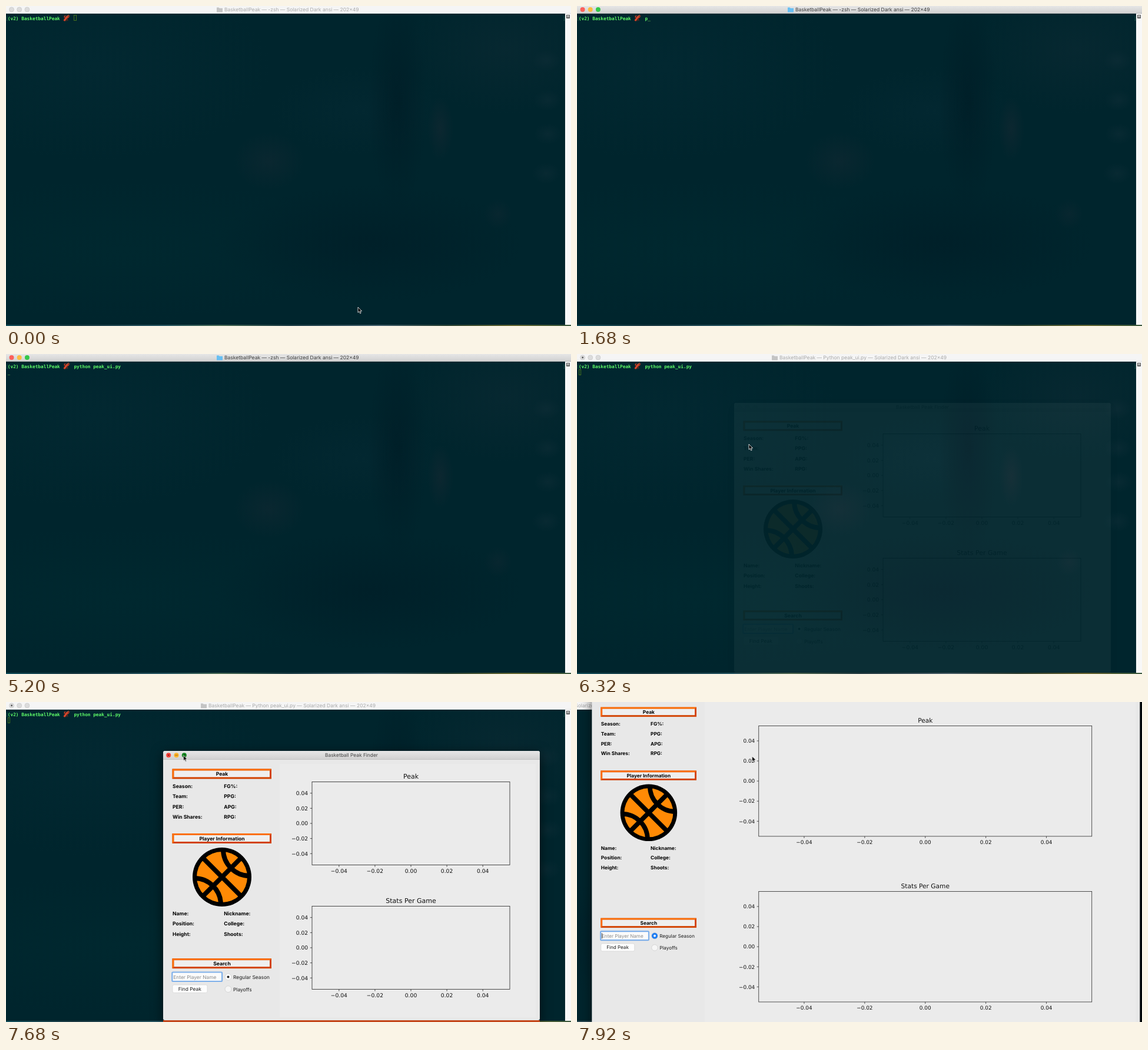
These frames come from a looping animation (960 by 543 pixels, 8000 ms). An HTML page:

```html
<!DOCTYPE html>
<html lang="en">
<head>
<meta charset="utf-8">
<title>Basketball Peak Finder</title>
<style>
html, body { margin: 0; width: 100%; height: 100%; overflow: hidden; background: #000; }
* { text-rendering: geometricPrecision; }
#stage { position: relative; width: 960px; height: 543px; overflow: hidden; background: #00080b; }
#stage svg { position: absolute; left: 0; top: 0; overflow: visible; }
#stage, #stage text { font-family: Inter, "Open Sans", sans-serif; }

/* every animation shares one 8 s clock: 1% = 80 ms */
.a { animation: 8s step-end infinite; }

#term { position: absolute; inset: 0; animation-name: slide; }
#screen {
  position: absolute; left: 0; top: 13px; width: 950px; height: 528px;
  background:
    radial-gradient(24px 18px at 918px 80px, #14303a66, transparent),
    radial-gradient(24px 18px at 920px 147px, #14303a66, transparent),
    radial-gradient(24px 18px at 921px 204px, #14303a66, transparent),
    radial-gradient(24px 18px at 918px 271px, #14303a66, transparent),
    radial-gradient(24px 26px at 836px 340px, #14293366, transparent),
    radial-gradient(60px 50px at 447px 250px, #14293380, transparent),
    radial-gradient(22px 55px at 738px 195px, #18293380, transparent),
    radial-gradient(50px 190px at 665px 150px, #001f28, transparent),
    radial-gradient(150px 75px at 600px 165px, #04293399, transparent),
    radial-gradient(170px 110px at 850px 60px, #0b2a3399, transparent),
    radial-gradient(260px 100px at 620px 390px, #002029, transparent),
    radial-gradient(420px 120px at 200px 400px, #00282f, transparent),
    radial-gradient(300px 160px at 150px 90px, #022831, transparent),
    #00252d;
}
#gutter { position: absolute; left: 950px; top: 13px; width: 10px; height: 528px; background: #f8f8f8; }
#gutter i {
  position: absolute; left: 2px; top: 2px; width: 4px; height: 4px; border: 1px solid #555;
  background: linear-gradient(#fff 25%, #555 25% 50%, #fff 50% 75%, #555 75%);
}
#desk {
  position: absolute; left: 0; top: 541px; width: 960px; height: 2px;
  background: linear-gradient(90deg, #14505c, #203c44 12%, #2c5a66 28%, #52705a 38%, #24424a 50%, #4c6672 66%, #33483a 78%, #6a6a34 90%, #3c5a40);
}
.mono {
  position: absolute; height: 11px; display: flex; white-space: pre;
  font: bold 7.79px/11px "DejaVu Sans Mono", monospace; color: #5ffa68;
}
.dim { color: #27604f; font-weight: normal; }
#typed { width: 0; overflow: hidden; animation-name: type; }
.cur { width: 4.7px; height: 10px; box-sizing: border-box; }
.line { border-bottom: 1px solid #35703f; }
.box { border: 1px solid #44701e; }
#c1 { position: absolute; left: 115px; top: 15px; animation-name: before-focus; }
#c2 { animation-name: row1; }
#c3 { position: absolute; left: 2.8px; top: 26px; animation-name: row2; }
#c4 { position: absolute; left: 2.8px; top: 26px; animation-name: after-blur; }

#b1 { animation-name: before-focus; }
#b2 { animation-name: zsh; }
#b3 { animation-name: python; }
#b4 { animation-name: after-blur; }

#small, #full { transform-origin: 0 0; filter: drop-shadow(0 5px 10px #0009); }
#small { animation-name: open; }
#full { animation-name: zoom; }
#lights { animation-name: hover; }
#ptr { animation: move 8s linear infinite; }
#ptr path { animation-name: shown; }
.b { font-weight: 700; }
#stage text.mpl { font-family: "DejaVu Sans", sans-serif; }

@keyframes type {
  0% { width: 0; } 21% { width: 4.69px; } 23% { width: 9.38px; } 25% { width: 14.07px; }
  28% { width: 23.45px; } 30% { width: 28.14px; } 31% { width: 32.83px; } 32% { width: 37.52px; }
  34% { width: 42.21px; } 36% { width: 46.9px; } 40% { width: 51.59px; } 44% { width: 56.28px; }
  48% { width: 60.97px; } 49% { width: 65.66px; } 51% { width: 70.35px; } 58% { width: 75.04px; }
  61%, 100% { width: 79.8px; }
}
@keyframes before-focus { 0% { opacity: 1; } 11%, 100% { opacity: 0; } }
@keyframes after-blur { 0% { opacity: 0; } 70%, 100% { opacity: 1; } }
@keyframes zsh { 0% { opacity: 0; } 11% { opacity: 1; } 66%, 100% { opacity: 0; } }
@keyframes python { 0% { opacity: 0; } 66% { opacity: 1; } 70%, 100% { opacity: 0; } }
@keyframes row1 { 0% { opacity: 0; } 11% { opacity: 1; } 63%, 100% { opacity: 0; } }
@keyframes row2 { 0% { opacity: 0; } 63% { opacity: 1; } 70%, 100% { opacity: 0; } }
@keyframes hover { 0% { opacity: 0; } 92%, 100% { opacity: 1; } }
@keyframes shown { 0% { opacity: 1; } 21% { opacity: 0; } 70%, 100% { opacity: 1; } }
@keyframes slide {
  0% { transform: none; } 97% { transform: translateX(-70px); }
  98% { transform: translateX(-270px); } 99%, 100% { transform: translateX(-509px); }
}
@keyframes open {
  0% { opacity: 0; transform: translate(267px, 83px); }
  79% { opacity: .05; transform: translate(267px, 83px); }
  80% { opacity: .45; transform: translate(267px, 83px); }
  81% { opacity: .85; transform: translate(267px, 83px); }
  82% { opacity: 1; transform: translate(267px, 83px); }
  97% { opacity: 1; transform: translate(218.6px, 62.3px) scale(1.091, 1.057); }
  98% { opacity: 1; transform: translate(121.8px, 20.8px) scale(1.273, 1.171); }
  99%, 100% { opacity: 0; transform: translate(25px, -20.7px); }
}
@keyframes zoom {
  0% { opacity: 0; transform: translate(267px, 83px) scale(.664, .752); }
  97% { opacity: .3; transform: translate(218.6px, 62.3px) scale(.724, .794); }
  98% { opacity: .8; transform: translate(121.8px, 20.8px) scale(.845, .88); }
  99%, 100% { opacity: 1; transform: translate(25.3px, -20.7px) scale(.9655); }
}
@keyframes move {
  0%, 70% { transform: translate(598px, 511px); animation-timing-function: ease-in-out; }
  79% { transform: translate(292px, 153px); animation-timing-function: ease-in-out; }
  94%, 96% { transform: translate(301.5px, 90.5px); }
  99%, 100% { transform: translate(297.5px, 92px); }
}
</style>
</head>
<body>
<div id="stage">
  <div id="term" class="a">
    <div id="screen"></div>
    <div id="gutter"><i></i></div>
    <div id="desk"></div>
    <svg id="bars" width="960" height="13"></svg>
    <div class="mono dim" style="left:-.8px;top:15.5px">[</div>
    <div class="mono dim" style="left:946px;top:15.5px">]</div>
    <div class="mono" style="left:2.8px;top:15.5px">(v2) BasketballPeak</div>
    <svg width="960" height="40" fill="none" stroke-linecap="round">
      <path d="M98 24.5L101 21M99.500 25.500L102 23M102 25.500L104 23M105 24.500L104 21" stroke="#8f2a16" stroke-width=".9"/>
      <path d="M99.500 24L104 18" stroke="#d8452a" stroke-width="3.200"/>
      <path d="M101 20L99 18.500L100.500 16.500M105 20L107 18L106.500 15.500" stroke="#c43a22" stroke-width="1.500"/>
      <path d="M104 17L105.500 15.500" stroke="#e9643c" stroke-width="1"/>
    </svg>
    <div class="mono" style="left:115.4px;top:15.500px">
      <span id="typed" class="a">python peak_ui.py</span><span id="c2" class="a cur line"></span>
    </div>
    <div id="c1" class="a cur box"></div>
    <div id="c3" class="a cur line"></div>
    <div id="c4" class="a cur box"></div>
  </div>
  <svg id="app" width="960" height="543"></svg>
</div>
<script>
const $ = id => document.getElementById(id);
const rect = (x, y, w, h, fill, more = '') =>
  `<rect x="${x}" y="${y}" width="${w}" height="${h}" fill="${fill}" ${more}/>`;
const dot = (x, y, r, fill, more = '') => `<circle cx="${x}" cy="${y}" r="${r}" fill="${fill}" ${more}/>`;
const path = (d, color, w) => `<path d="${d}" fill="none" stroke="${color}" stroke-width="${w}"/>`;

// text centred vertically on y
const text = (x, y, s, { size = 8.4, anchor = 'start', cls = '', fill = '#1c1c1c' } = {}) =>
  `<text x="${x}" y="${y + size * .364}" font-size="${size}" text-anchor="${anchor}" class="${cls}" fill="${fill}">${s}</text>`;
const bold = (x, y, s, anchor) => text(x, y, s, { size: 8.6, cls: 'b', fill: '#000', anchor });

// terminal title bar
function bar(id, active, cmd, x) {
  const colors = active ? ['#fc605b', '#fdbc40', '#34c84a'] : ['#dcdcdc', '#dcdcdc', '#dcdcdc'];
  const ink = active ? '#3c3c3c' : '#a9a9a9';
  const folder = active ? '#68bff2' : '#c4c4c4';
  const lights = colors.map((c, i) =>
    dot(9.5 + i * 13.2, 6, 4, c, active ? '' : 'stroke="#c8c8c8" stroke-width=".7"')).join('');
  const busy = cmd !== '-zsh' ? dot(9.6, 6, 1.4, active ? '#7c1d1a' : '#555') : '';
  return `<g id="${id}" class="a">${rect(0, 0, 960, 13, active ? 'url(#tb)' : '#f5f5f5')}
    ${rect(0, 12.4, 960, .6, active ? '#a8a8a8' : '#d4d4d4')}${lights}${busy}
    <path d="M${x - 13} 2.500h3.600l1 1.200h5.400v6.800h-10z" fill="${folder}"/>
    ${text(x, 6.2, `BasketballPeak — ${cmd} — Solarized Dark ansi — 202×49`, { size: 8.5, fill: ink })}</g>`;
}

// heading with a bevelled orange frame
const heading = (y, s) =>
  rect(282.5, y - 8.5, 168.5, 17, '#d24200') +
  `<path d="M282.500 ${y + 8.5}v-17h168.500l-3 3h-162.500v11z" fill="#fb6f08"/>` +
  rect(285.5, y - 5.5, 162.5, 11, '#efefef') + bold(367, y, s, 'middle');

const labels = (y, left, right) => left.map((s, i) =>
  bold(283, y + i * 17.4, s + ':') + bold(370.3, y + i * 17.4, right[i] + ':')).join('');

const ball = (x, y) => `<g transform="translate(${x} ${y})">${dot(0, 0, 50, '#000')}
  <g clip-path="url(#ballclip)">${dot(0, 0, 43, '#ff8a05')}
  ${path('M-40 -40L40 40M-40 40L40 -40', '#000', 8)}
  ${dot(47, -47, 45, 'none', 'stroke="#000" stroke-width="8"')}
  ${dot(-47, 47, 45, 'none', 'stroke="#000" stroke-width="8"')}</g></g>`;

function plot(x, y, w, h, title) {
  const o = { size: 9.2, cls: 'mpl', fill: '#111' };
  let s = rect(x, y, w, h, 'none', 'stroke="#222" stroke-width=".8"') +
    text(x + w / 2, y - 10, title, { size: 11, anchor: 'middle', cls: 'mpl', fill: '#111' });
  for (let i = -2; i <= 2; i++) {
    const label = (i < 0 ? '−' : '') + (Math.abs(i) * .02).toFixed(2);
    const tx = x + w / 2 + i * w / 5.5, ty = y + h / 2 - i * h / 5.5;
    s += path(`M${tx} ${y + h}v3.200M${x} ${ty}h-3.200`, '#222', .8) +
      text(tx, y + h + 10.3, label, { ...o, anchor: 'middle' }) +
      text(x - 6.8, ty, label, { ...o, anchor: 'end' });
  }
  return s;
}

const radio = (y, s, fill, core) =>
  dot(377.5, y, 5.4, fill, 'stroke="#c4c4c4" stroke-width=".6"') +
  (core ? dot(377.5, y, 2, core) : '') + text(386, y + .3, s);

function search(focused) {
  return heading(443.7, 'Search') +
    rect(282.3, 458.5, 84.8, 15.5, '#fbfbfb', 'rx="1.5" stroke="#7fb0ea" stroke-width="2.2"') +
    text(284.3, 466.6, 'Enter Player Name', { fill: '#8c8c8c' }) +
    (focused ? rect(284.2, 461.5, .8, 10, '#111') : '') +
    rect(283, 480, 59, 13.4, '#fdfdfd', 'rx="2.500" stroke="#cfcfcf" stroke-width=".6"') +
    text(312.3, 486.8, 'Find Peak', { anchor: 'middle' }) +
    radio(466.4, 'Regular Season', focused ? '#1a7cf5' : '#fdfdfd', focused ? '#fff' : '#222') +
    radio(487.2, 'Playoffs', '#f6f6f6');
}

const lights = colors => colors.map((c, i) => dot(276.2 + i * 13.3, 90.2, 4, c)).join('');

function win(id, w, h, { infoDy, searchDy, focused, plots, extra }) {
  const panel = focused ? h - 14.5 : 430;
  return `<g id="${id}" class="a"><g transform="translate(-267 -83)">
    ${rect(267, 83, w, h, '#e8e8e8', 'rx="3"')}
    <path d="M267 97.500V86.500q0 -3.500 3.500 -3.500h${w - 7}q3.500 0 3.500 3.500v11z" fill="url(#tb)"/>
    ${rect(267, 97, w, .6, '#b4b4b4')}
    ${rect(465, focused ? 97.6 : 105, w - 205, panel, '#ebebeb')}
    ${text(267 + w / 2, 90.2, 'Basketball Peak Finder', { anchor: 'middle', fill: '#444' })}
    ${lights(['#cfcfcf', '#cfcfcf', '#cfcfcf'])}${extra}
    ${heading(122, 'Peak')}
    ${labels(142.7, ['Season', 'Team', 'PER', 'Win Shares'], ['FG%', 'PPG', 'APG', 'RPG'])}
    <g transform="translate(0 ${infoDy})">${heading(231.5, 'Player Information')}${ball(367, 297)}
    ${labels(358.9, ['Name', 'Position', 'Height'], ['Nickname', 'College', 'Shoots'])}</g>
    <g transform="translate(0 ${searchDy})">${search(focused)}</g>
    ${plots}</g></g>`;
}

const hover = `<g id="lights" class="a">${lights(['#f9463d', '#fdb52c', '#158a22'])}
  ${path('M274.500 88.500l3.400 3.400m0 -3.400l-3.400 3.400', '#7a0c08', .9)}
  ${path('M287.200 90.200h4.600', '#96580a', .9)}
  ${path('M301 92l3.400 -3.400', '#053f0b', 1.3)}</g>`;

$('bars').innerHTML = `<defs><linearGradient id="tb" x2="0" y2="1">
  <stop stop-color="#e6e6e6"/><stop offset="1" stop-color="#d0d0d0"/></linearGradient>
  <clipPath id="ballclip"><circle r="49"/></clipPath></defs>` +
  bar('b1', false, '-zsh', 371) + bar('b2', true, '-zsh', 371) +
  bar('b3', true, 'Python peak_ui.py', 344) + bar('b4', false, 'Python peak_ui.py', 344);

$('app').innerHTML =
  win('small', 640, 457, {
    infoDy: 0, searchDy: 0, focused: false,
    plots: plot(520, 135.5, 336, 141, 'Peak') + plot(520, 346.5, 336, 141, 'Stats Per Game'),
    extra: hover + rect(267, 540, 640, 3, '#c4481c')
  }) +
  win('full', 964.3, 608, {
    infoDy: 2, searchDy: 49, focused: true,
    plots: plot(560.6, 146.3, 586.2, 194.2, 'Peak') + plot(560.6, 437.4, 586.2, 194.2, 'Stats Per Game'),
    extra: ''
  }) +
  `<g id="ptr"><path class="a" d="M0 0V9.200L2.100 7.300L3.600 10.700L5.200 10L3.700 6.700H6.600Z"
    fill="#000" stroke="#fff" stroke-width=".8"/></g>`;
</script>
</body>
</html>
```
